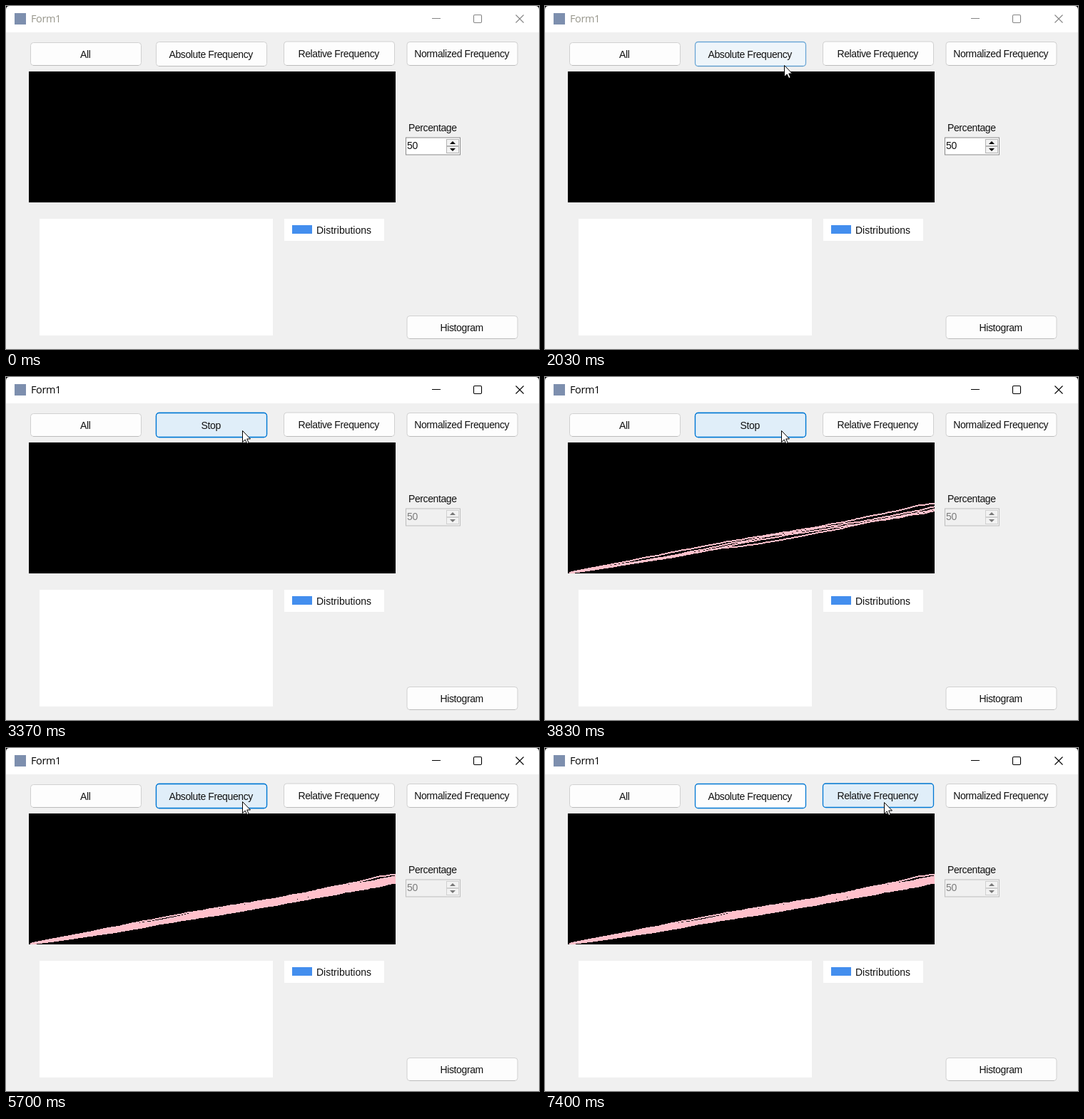
Animation of 747 by 482 pixels, one loop 7.99 s. Source, as an HTML page with a canvas:

```html
<!DOCTYPE html>
<html lang="en">
<head>
<meta charset="utf-8">
<title>Form1</title>
<style>
  html, body { margin: 0; width: 100%; height: 100%; overflow: hidden; background: #f0f0f0; }
  #stage { position: relative; width: 747px; height: 482px; overflow: hidden; }
  #stage > * { position: absolute; left: 0; top: 0; }
  #stage > canvas { left: 32px; top: 92px; }
  text { font: 14px "Liberation Sans", Arial, sans-serif; letter-spacing: -.4px; fill: #111; }
  .title { font: 14.5px "Open Sans", "Noto Sans", sans-serif; fill: #96958a; }
  .controls { fill: none; stroke: #858585; stroke-width: 1.1; }
  .active .title { fill: #000; }
  .active .controls { stroke: #000; }
  .box { fill: #fff; stroke: #8a8a8a; }
  .spin { fill: #f2f2f2; stroke: #b4b4b4; }
  .running .box { fill: #f0f0f0; stroke: #bdbdbd; }
  .running .num { fill: #7c7c7c; }
  .running .arrow { fill: #777; }
  .running .spin { stroke: #d0d0d0; }
  .legend { letter-spacing: 0; }
</style>
</head>
<body>
<div id="stage">
  <svg id="form" width="747" height="482">
    <rect width="747" height="482" fill="#f0f0f0"/>
    <rect width="747" height="37" fill="#fff"/>
    <path d="M0 0h5q-5 0-5 5zM747 0h-5q5 0 5 5z"/>
    <rect x="12" y="10" width="16" height="16" fill="#7d8fae"/>
    <text class="title" x="35" y="23">Form1</text>
    <g class="controls">
      <path d="M597 17.5h12M714.5 12.5l11 11m0-11l-11 11"/>
      <rect x="655.5" y="12.5" width="11" height="11" rx="1.5"/>
    </g>
    <rect x="47" y="299" width="327" height="164" fill="#fff"/>
    <rect x="390" y="299" width="140" height="31" fill="#fff"/>
    <rect x="401" y="308" width="28" height="12" fill="#438eee"/>
    <text class="legend" x="435" y="319.5">Distributions</text>
    <text x="564" y="176">Percentage</text>
    <rect class="box" x="560.5" y="185" width="76" height="24"/>
    <text class="num" x="562" y="201">50</text>
    <rect class="spin" x="617.5" y="187.5" width="17" height="9"/>
    <rect class="spin" x="617.5" y="197.5" width="17" height="9"/>
    <path class="arrow" d="M622 194h8l-4-4zM622 200h8l-4 4z"/>
    <g id="buttons"></g>
  </svg>
  <canvas id="plot" width="514" height="184"></canvas>
  <svg width="747" height="482">
    <circle id="click" cx="331" cy="75" fill="#fbf43c" fill-opacity=".72"/>
    <path id="cursor" d="M.5 .5V16.5L4.2 13L6.8 18.6L9.2 17.5L6.7 12H11.5Z" fill="#fff" stroke="#000"/>
  </svg>
</div>
<script>
const LOOP = 7990, STEP = 70;
const CLICK = 3170, ACTIVE = CLICK + STEP, RUN = CLICK + 2 * STEP, DONE = 5700;
const FIRST_PATH = 3450, PATH_GAP = 100, PATHS = 22;
const W = 514, H = 184, BUTTON_W = 156;
const $ = id => document.getElementById(id);

function svg(parent, tag, attrs) {
  const el = document.createElementNS("http://www.w3.org/2000/svg", tag);
  for (const k in attrs) el.setAttribute(k, attrs[k]);
  return parent.appendChild(el);
}

function button(label, x, y, h) {
  const size = { x: x + .5, y: y + .5, width: BUTTON_W - 1, height: h - 1, rx: 4 };
  const blue = { ...size, stroke: "#0078d4", "stroke-width": 1.3, opacity: 0 };
  const g = svg($("buttons"), "g", {});
  svg(g, "rect", { ...size, fill: "#fdfdfd", stroke: "#d0d0d0" });
  svg(g, "path", { d: `M${x + 4} ${y + h - .5}h${BUTTON_W - 8}`, stroke: "#bcbcbc" });
  const focus = svg(g, "rect", { ...blue, fill: "#fdfdfd" });
  const hover = svg(g, "rect", { ...blue, fill: "#e0eef9" });
  const text = svg(g, "text", { x: x + BUTTON_W / 2 - .8, y: y + h / 2 + 5.3, "text-anchor": "middle" });
  text.textContent = label;
  const contains = p => p && p[0] >= x && p[0] <= x + BUTTON_W && p[1] >= y && p[1] <= y + h;
  return { focus, hover, text, contains };
}

const all = button("All", 34, 51, 33);
const absolute = button("Absolute Frequency", 210, 50, 35);
const relative = button("Relative Frequency", 389, 49.5, 34.5);
const normalized = button("Normalized Frequency", 561.5, 50, 34);
const histogram = button("Histogram", 561.5, 435, 33);
const buttons = [all, absolute, relative, normalized, histogram];

// The pointer enters from below, then makes these moves
const entry = [680, 484];
const moves = [
  { start: 460, end: 950, to: [326, 93] },
  { start: 1150, end: 1360, to: [361, 114] },
  { start: 1760, end: 1830, to: [339, 90] },
  { start: 2030, end: 2100, to: [331, 75] },
  { start: 6700, end: 7400, to: [475, 76] }
];

function pointerAt(t) {
  if (t < moves[0].start) return null;
  let pos = entry;
  for (const { start, end, to } of moves) {
    if (t < start) break;
    const done = (Math.floor((t - start) / STEP) + 1) * STEP;
    const p = Math.min(1, done / (end - start + STEP));
    const e = p * p * (3 - 2 * p);
    pos = pos.map((v, i) => v + (to[i] - v) * e);
  }
  return pos;
}

let seed = 11;
function random() {
  seed = (seed * 1664525 + 1013904223) >>> 0;
  return seed / 4294967296;
}

// A rising count that never falls; paths fan out like a random walk
function makePath(_, i) {
  const lane = i ? .2 + .8 * (i * .618 % 1) : 0;
  const phase = random() * 2 * Math.PI;
  let jitter = 0, y = H;
  return Array.from({ length: W }, (_, x) => {
    const u = x / W;
    if (x % 4 === 0) jitter = jitter * .85 + random() - .5;
    const middle = 182.5 - 92 * u + 1.5 * Math.sin(Math.PI * u);
    const wave = 1.6 * Math.sin(Math.PI * u) * Math.sin(phase + 9 * u);
    const offset = (2 * lane - 1) * 6 * Math.sqrt(u);
    return y = Math.min(y, middle + offset + wave + jitter * Math.sqrt(u));
  });
}

const paths = Array.from({ length: PATHS }, makePath);
const ctx = $("plot").getContext("2d");
let drawn = -1;

function drawPlot(count) {
  if (count === drawn) return;
  drawn = count;
  ctx.fillStyle = "#000";
  ctx.fillRect(0, 0, W, H);
  ctx.fillStyle = "#ffc0cb";
  for (const ys of paths.slice(0, count)) {
    ys.forEach((y, x) => x > 1 && ctx.fillRect(x, Math.round(y), 1, 2));
  }
}

function render(t) {
  const running = t >= RUN;
  $("form").setAttribute("class", (t >= ACTIVE ? "active " : "") + (running ? "running" : ""));
  absolute.text.textContent = running && t < DONE ? "Stop" : "Absolute Frequency";
  absolute.focus.setAttribute("opacity", t >= CLICK ? 1 : 0);

  // Hover colour fades over two steps
  const now = pointerAt(t), before = pointerAt(t - STEP);
  for (const b of buttons) b.hover.setAttribute("opacity", (b.contains(now) + b.contains(before)) / 2);

  const clicking = t >= CLICK && t < RUN;
  $("click").setAttribute("r", clicking ? 15 - 4 * Math.floor((t - CLICK) / STEP) : 0);
  $("cursor").setAttribute("visibility", now ? "visible" : "hidden");
  if (now) $("cursor").setAttribute("transform", `translate(${now.map(Math.round)})`);
  drawPlot(Math.max(0, Math.min(PATHS, Math.floor((t - FIRST_PATH) / PATH_GAP) + 1)));
}

const began = performance.now();
function tick() {
  render((performance.now() - began) % LOOP);
  requestAnimationFrame(tick);
}
tick();
</script>
</body>
</html>
```
